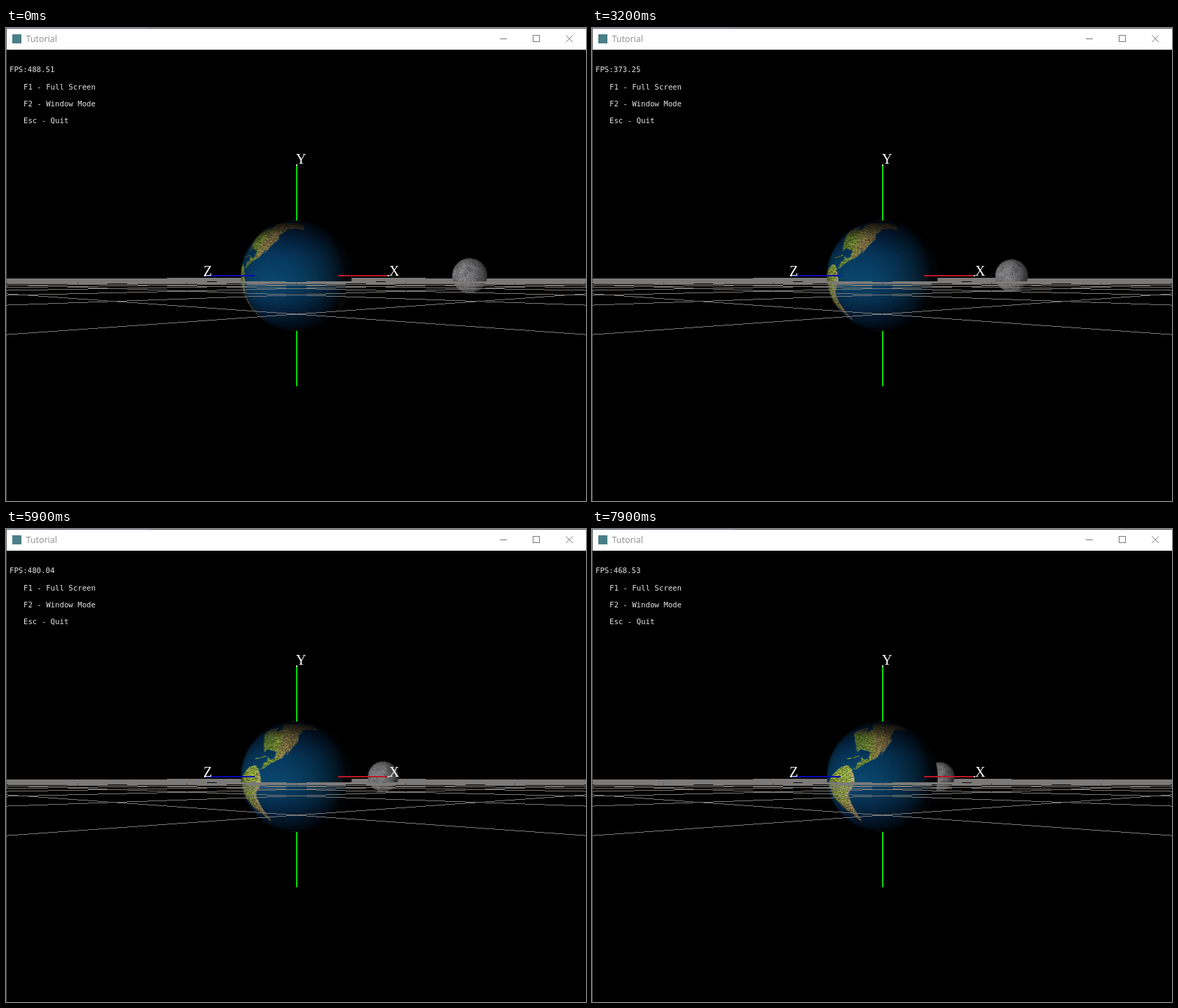
Animation, 828 px wide and 676 px high, one loop 8000 ms. Source, as an HTML page with a canvas:

```html
<!DOCTYPE html>
<html lang="en">
<head>
<meta charset="utf-8">
<title>Tutorial</title>
<style>
html, body { margin: 0; width: 100%; height: 100%; overflow: hidden; background: #000; }
canvas { display: block; }
</style>
</head>
<body>
<canvas id="stage" width="828" height="676"></canvas>
<script>
const g = document.getElementById('stage').getContext('2d');
const CX = 414.5, CY = 354, FOCAL = 780, GRID = 17;
const MAP_LON = -270, SCALE = 3;
const LIGHT = [-0.45, 0.06, 0.88];
const FPS = ['488.51', '521.96', '502.37', '373.25', '441.12', '395.80', '480.04', '452.66', '468.53'];
// Moon centre: time in seconds, x
const MOON = [[0, 662], [1.3, 633], [3.2, 599], [4.5, 569.5], [5.9, 538.5], [6.6, 523], [7.9, 496.5]];

// Outlines as longitude, latitude pairs
const NORTH = [-168,66, -156,71, -128,70, -95,72, -82,68, -94,60, -82,53, -78,62, -62,58, -56,52,
  -66,45, -75,36, -81,26, -84,30, -97,27, -96,19, -91,18, -87,21, -88,16, -83,14, -82,9, -77,8,
  -83,8, -92,14, -105,20, -112,30, -110,23, -117,33, -124,41, -124,48, -135,58, -152,59, -163,55];
const SOUTH = [-77,8, -72,12, -62,10, -51,4, -35,-6, -39,-14, -41,-22, -48,-27, -57,-37, -65,-42,
  -68,-54, -74,-52, -73,-38, -70,-18, -77,-12, -81,-5, -80,1];
const ANDES = [-72,-50, -70,-32, -68,-19, -76,-11, -79,-3, -76,5];
const CUBA = [-84,22, -77,20, -69,19];

let seed = 7;
const rnd = () => (seed = seed * 16807 % 2147483647) / 2147483647;
const mapX = lon => (lon - MAP_LON) * SCALE;
const mapY = lat => (90 - lat) * SCALE;

function layer(w, h) {
  const c = document.createElement('canvas');
  c.width = w;
  c.height = h;
  return c.getContext('2d');
}

function gradient(c, x0, y0, x1, y1, stops) {
  const gr = c.createLinearGradient(x0, y0, x1, y1);
  stops.forEach(([p, color]) => gr.addColorStop(p, color));
  return gr;
}

function outline(c, pts) {
  c.beginPath();
  for (let i = 0; i < pts.length; i += 2) c.lineTo(mapX(pts[i]), mapY(pts[i + 1]));
}

// Grain: multiplies each pixel by a random factor, stronger on land
function grain(c, amount) {
  const img = c.getImageData(0, 0, 1080, 540), d = img.data;
  for (let i = 0; i < d.length; i += 4) {
    const k = 1 + (rnd() - 0.5) * amount(d[i]);
    for (let j = 0; j < 3; j++) d[i + j] *= k;
  }
  return d;
}

function earthMap() {
  const c = layer(1080, 540);
  c.lineJoin = c.lineCap = 'round';
  c.fillStyle = gradient(c, 0, 0, 0, 540,
    [[0, '#04101f'], [0.22, '#042244'], [0.38, '#073a62'], [0.54, '#0a486f'], [0.7, '#063056'], [1, '#030e26']]);
  c.fillRect(0, 0, 1080, 540);
  const north = gradient(c, mapX(-128), 0, mapX(-70), 0,
    [[0, '#6e5f3c'], [0.4, '#8c7e4a'], [0.58, '#748a34'], [1, '#587a30']]);
  const south = gradient(c, 0, mapY(8), 0, mapY(-50),
    [[0, '#8ea440'], [0.45, '#94a840'], [0.7, '#968c50'], [1, '#7c6648']]);
  for (const [pts, fill] of [[NORTH, north], [SOUTH, south]]) {
    outline(c, pts);
    c.closePath();
    c.strokeStyle = 'rgba(30,100,130,.4)';
    c.lineWidth = 5;
    c.stroke();
    c.fillStyle = fill;
    c.fill();
    if (pts === NORTH) {
      c.fillStyle = gradient(c, 0, mapY(72), 0, mapY(42),
        [[0, 'rgba(44,40,32,.95)'], [0.5, 'rgba(72,64,44,.8)'], [1, 'rgba(90,84,50,0)']]);
      c.fill();
    }
  }
  c.lineWidth = 7;
  c.strokeStyle = '#b8987c';
  outline(c, ANDES);
  c.stroke();
  c.lineWidth = 4;
  c.strokeStyle = '#627c38';
  outline(c, CUBA);
  c.stroke();
  c.fillStyle = '#8a6c44';
  c.beginPath();
  c.ellipse(mapX(-226), mapY(-25), 54, 36, 0, 0, 7);
  c.fill();
  c.fillStyle = '#666664';
  c.fillRect(0, 0, 1080, 24);
  c.fillStyle = '#8a8a88';
  c.fillRect(0, 510, 1080, 30);
  return grain(c, red => red > 40 ? 0.9 : 0.1);
}

function moonMap() {
  const c = layer(1080, 540);
  c.fillStyle = '#7c7c7e';
  c.fillRect(0, 0, 1080, 540);
  for (let i = 0; i < 420; i++) {
    c.fillStyle = rnd() < 0.5 ? 'rgba(80,80,82,.2)' : 'rgba(165,165,165,.16)';
    c.beginPath();
    c.arc(rnd() * 1080, rnd() * 540, 6 + rnd() * 26, 0, 7);
    c.fill();
  }
  return grain(c, () => 0.35);
}

// Orthographic globe; the maps run mirrored, with west on the right
function globe(map, cx, cy, R, lon0, ambient) {
  const half = Math.ceil(R) + 1, size = half * 2;
  const c = layer(size, size), img = c.createImageData(size, size);
  for (let py = 0; py < size; py++) for (let px = 0; px < size; px++) {
    let x = (px + 0.5 - half) / R, y = (half - py - 0.5) / R;
    const r = Math.hypot(x, y), alpha = Math.min(1, (1 - r) * R + 0.5);
    if (alpha <= 0) continue;
    if (r > 0.999) { x *= 0.999 / r; y *= 0.999 / r; }
    const z = Math.sqrt(1 - x * x - y * y);
    const lon = lon0 - Math.atan2(x, z) * 180 / Math.PI;
    const lat = Math.asin(y) * 180 / Math.PI;
    const m = (Math.floor(mapY(lat)) * 1080 + Math.floor(mapX(lon))) * 4;
    const o = (py * size + px) * 4;
    const lit = ambient + (1 - ambient) * Math.max(0, x * LIGHT[0] + y * LIGHT[1] + z * LIGHT[2]);
    for (let j = 0; j < 3; j++) img.data[o + j] = map[m + j] * lit;
    img.data[o + 3] = alpha * 255;
  }
  c.putImageData(img, 0, 0);
  g.drawImage(c.canvas, cx - half, cy - half);
}

function line(x0, y0, x1, y1, color, width = 1) {
  g.strokeStyle = color;
  g.lineWidth = width;
  g.beginPath();
  g.moveTo(x0, y0);
  g.lineTo(x1, y1);
  g.stroke();
}

function text(s, x, y, font, color) {
  g.font = font;
  g.fillStyle = color;
  g.fillText(s, x, y);
}

// Floor seen along its diagonal, in hard one-pixel lines:
// each line n passes through (-FOCAL, 0) or its mirror
function gridLayer() {
  const c = layer(828, 676);
  c.fillStyle = '#7c7a78';
  for (let n = 1; n <= GRID; n++) {
    const start = FOCAL * (n - GRID) / (n + GRID);
    for (let px = 0; px < 828; px++) for (const side of [1, -1]) {
      const x = side * (px + 0.5 - CX);
      if (x >= start) c.fillRect(px, Math.floor(CY + 55 / n * (1 + x / FOCAL)), 1, 1);
    }
  }
  return c.canvas;
}

function windowFrame() {
  g.fillStyle = '#fff';
  g.fillRect(0, 0, 828, 31);
  g.fillStyle = '#505250';
  g.fillRect(0, 0, 828, 1);
  g.fillRect(0, 0, 1, 676);
  g.fillStyle = '#56607a';
  g.fillRect(0, 0, 204, 1);
  g.fillStyle = '#4a7f88';
  g.fillRect(9, 9, 13, 13);
  text('Tutorial', 28.5, 20, '12.5px "Open Sans", sans-serif', '#8c8c8c');
  line(705, 15.5, 715, 15.5, '#777');
  g.strokeRect(752.5, 10.5, 9, 9);
  line(799.5, 10.5, 809, 20, '#777');
  line(809, 10.5, 799.5, 20, '#777');
}

function moonX(t) {
  const i = Math.max(1, MOON.findIndex(k => k[0] >= t));
  const [t0, x0] = MOON[i - 1], [t1, x1] = MOON[i];
  return x0 + (x1 - x0) * (t - t0) / (t1 - t0);
}

const earth = earthMap(), moon = moonMap(), grid = gridLayer();

function draw(t) {
  const lon = -149.5 + 4.87 * t;
  g.fillStyle = '#000';
  g.fillRect(0, 0, 828, 676);
  g.drawImage(grid, 0, 0);
  line(415, 196, 415, 512, '#00d800', 2);
  globe(moon, moonX(t), CY, 25 - 0.53 * t, lon, 0.4);
  globe(earth, CX, CY, 79, lon, 0.08);
  // Floor in front of the globes
  g.drawImage(grid, 0, 362, 828, 314, 0, 362, 828, 314);

  line(284, 354, 355, 354, '#0808b0', 2);
  line(474, 354, 546, 354, '#b81828', 2);
  g.fillStyle = '#fff';
  for (const [x, y] of [[283, 353], [545, 353], [414, 195]]) g.fillRect(x, y, 2, 2);
  const serif = '20px "Liberation Serif", serif';
  text('Y', 414, 194, serif, '#fff');
  text('X', 547, 354, serif, '#fff');
  text('Z', 282, 354, serif, '#fff');

  const mono = '10.7px "DejaVu Sans Mono", monospace';
  text('FPS:' + FPS[Math.floor((t + 0.4) / 1.01)], 5, 63, mono, '#e4e4e4');
  ['F1 - Full Screen', 'F2 - Window Mode', 'Esc - Quit'].forEach((s, i) =>
    text(s, 25, 87.5 + i * 24.3, mono, '#e4e4e4'));
  windowFrame();
}

let last = -1;
function tick() {
  const step = Math.floor(performance.now() % 8000 / 100);
  if (step !== last) draw((last = step) / 10);
  requestAnimationFrame(tick);
}
tick();
</script>
</body>
</html>
```
